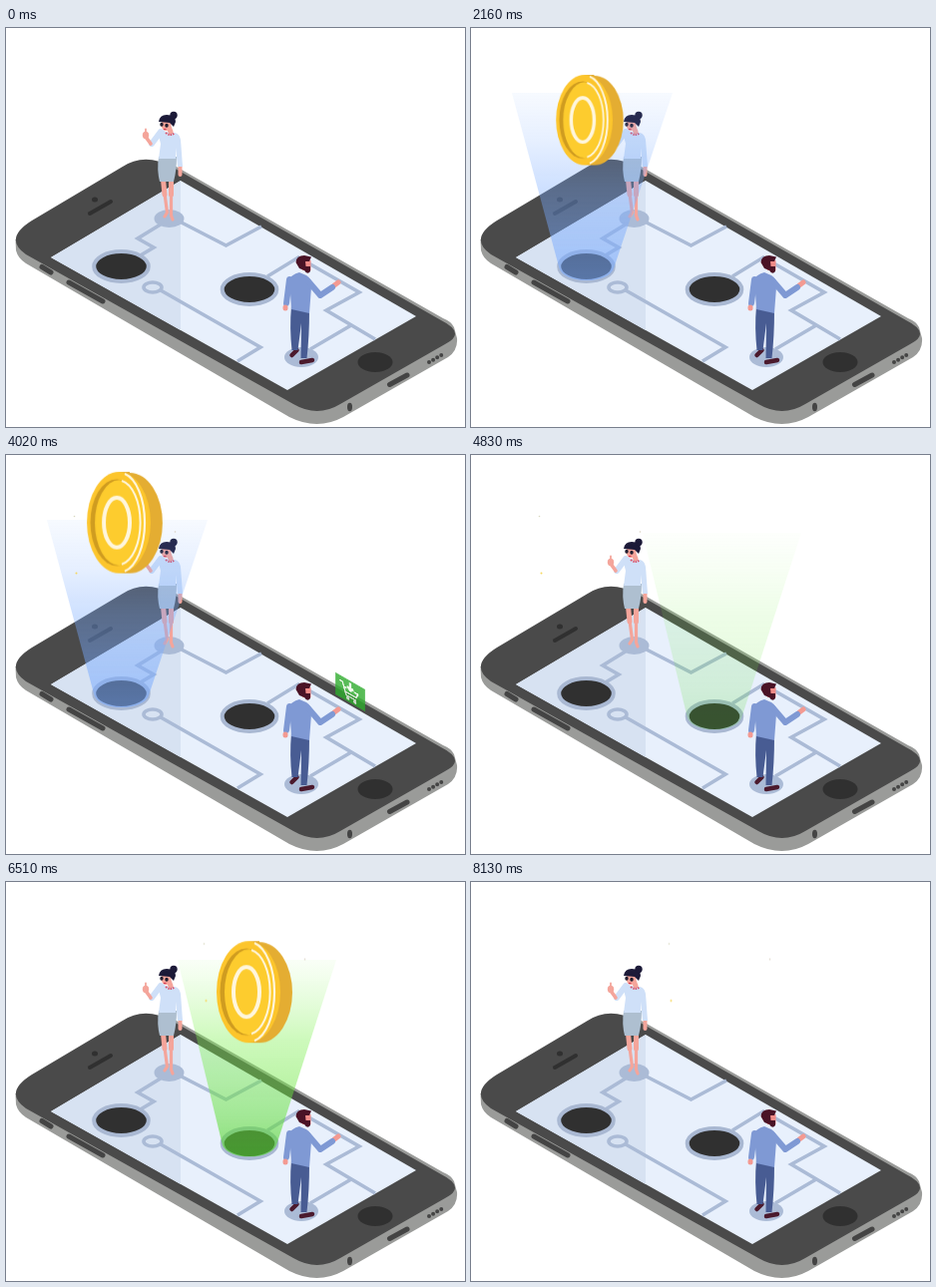
These frames come from a looping animation (460 px wide and 400 px high, 8.28 s). An HTML page:

```html
<!DOCTYPE html>
<html lang="en">
<head>
<meta charset="utf-8">
<title>Isometric phone with coins</title>
<style>
  html, body { margin: 0; width: 100%; height: 100%; overflow: hidden; background: #fff; }
  svg { display: block; width: 460px; height: 400px; }

  .trace { fill: none; stroke: #abbbd6; stroke-width: 3.6; }
  .slot { fill: none; stroke: #444; stroke-width: 5; stroke-linecap: round; }
  .limb { fill: none; stroke-linecap: round; stroke-linejoin: round; }
  .hole { fill: #303030; stroke: #a9b8d2; stroke-width: 4; }
  .skin { stroke: #f4a59b; }

  /* Both beams run the same sequence, started at different times. */
  .blue { --start: -7050ms; }
  .green { --start: -3690ms; }
  .beam, .coin, .sparks { animation: 8280ms linear var(--start) infinite; }
  .beam { animation-name: beam; }
  .coin { animation-name: coin, show; }
  .sparks { animation-name: sparks; animation-timing-function: step-end; }
  .card { animation: card 8280ms linear infinite; }
  .arm { transform-origin: 154px 104px; animation: arm 8280ms ease-in-out infinite; }
  .forearm { transform-origin: 145px 116px; animation: forearm 8280ms ease-in-out infinite; }

  @keyframes beam {
    0% { opacity: 0; }
    8.45%, 36.35% { opacity: 1; }
    42.75%, 100% { opacity: 0; }
  }
  @keyframes coin {
    0%, 8.57% { transform: translateY(180px) scale(.2); animation-timing-function: cubic-bezier(.333, 1, .667, 1); }
    14.13% { transform: none; }
    19.57% { transform: none; animation-timing-function: ease-in-out; }
    26.21% { transform: translateY(40px); animation-timing-function: ease-in-out; }
    32.85% { transform: none; animation-timing-function: cubic-bezier(.333, 0, .667, 0); }
    38.41%, 100% { transform: translateY(180px) scale(.2); }
  }
  @keyframes show {
    0%, 8.57% { opacity: 0; }
    10%, 36.9% { opacity: 1; }
    38.41%, 100% { opacity: 0; }
  }
  @keyframes sparks {
    0% { opacity: 0; }
    12.68% { opacity: 1; }
    44.56%, 100% { opacity: 0; }
  }
  @keyframes card {
    0%, 32.13% { transform: scale(0); opacity: 1; }
    35.14%, 47.34% { transform: scale(1); opacity: 1; }
    50.36%, 100% { transform: scale(0); opacity: .5; }
  }
  @keyframes arm {
    0%, .36%, 6.52%, 100% { transform: rotate(0deg); }
    2.2% { transform: rotate(45deg); }
    4.2% { transform: rotate(-20deg); }
  }
  @keyframes forearm {
    0%, .36%, 6.52%, 100% { transform: rotate(0deg); }
    2.2% { transform: rotate(-100deg); }
    4.2% { transform: rotate(-110deg); }
  }
</style>
</head>
<body>
<svg viewBox="0 0 460 400">
  <defs>
    <linearGradient id="blueLight" x2="0" y2="1">
      <stop offset="0" stop-color="#78aaff" stop-opacity=".06"/>
      <stop offset=".25" stop-color="#78aaff" stop-opacity=".18"/>
      <stop offset=".5" stop-color="#78aaff" stop-opacity=".36"/>
      <stop offset="1" stop-color="#78aaff" stop-opacity=".58"/>
    </linearGradient>
    <linearGradient id="greenLight" x2="0" y2="1">
      <stop offset="0" stop-color="#a0f878" stop-opacity=".06"/>
      <stop offset=".4" stop-color="#7df04f" stop-opacity=".38"/>
      <stop offset=".8" stop-color="#66e03c" stop-opacity=".54"/>
      <stop offset="1" stop-color="#52d030" stop-opacity=".66"/>
    </linearGradient>
    <g id="coin">
      <ellipse cx="5" cy=".5" rx="33" ry="50.5" fill="#e4ad32"/>
      <path d="M-6-51H5V51H-6Z" fill="#e4ad32"/>
      <ellipse cx="-6" rx="32" ry="51" fill="#fcc52c"/>
      <ellipse cx="-8" rx="26.5" ry="43.5" fill="#cf9c20"/>
      <ellipse cx="-5.5" cy=".3" rx="24.5" ry="43" fill="#fdcc2e"/>
      <g fill="none" stroke="#fff6dc">
        <path stroke-width="2.2" d="M0-49A25 50 0 0 1 0 49"/>
        <path stroke-width="2" d="M-3-42A22 42.500 0 0 1-3 42"/>
        <ellipse cx="-8" rx="13" ry="25" stroke-width="4"/>
      </g>
    </g>
    <g id="sparks">
      <circle cx="68.5" cy="61.5" r=".8" fill="#d8d8c0"/>
      <circle cx="169.5" cy="77" r=".8" fill="#d8d0c0"/>
      <circle cx="70.5" cy="118.5" r="1" fill="#f5d860"/>
    </g>
  </defs>

  <g id="phone">
    <path fill="#9a9b99" d="M9.500 212L10 223Q12 231 20 236L284 390Q312 404 338 390L443 330Q453 323 452 311L449 300Q446 294 438 291L168 137.500L100 190Z"/>
    <path fill="#4a4a4a" d="M26 193L116 139.500Q139 124 167 139.500L436 293Q462 306 440 317L335 377Q312 391 288 377L20 227Q-3 211 26 193Z"/>
    <path fill="#e8f0fc" d="M45 230L175 153L411 289L282 363Z"/>
    <path fill="#d7e2f2" d="M45 230L175 153V303Z"/>
    <path class="slot" d="M36 239.500L45 245M63 255L97 274"/>
    <path class="slot" stroke-width="4.500" d="M384.500 357.500L402 348"/>
    <path d="M84 186L105 174" stroke="#303030" stroke-width="4" stroke-linecap="round"/>
    <ellipse cx="89" cy="172" rx="3" ry="2.500" fill="#303030"/>
    <ellipse cx="370" cy="335" rx="17.500" ry="10" fill="#303030"/>
    <ellipse cx="344.500" cy="380" rx="2.500" ry="4.200" fill="#444"/>
    <path d="M424 335L438 327" stroke="#444" stroke-width="4" stroke-linecap="round" stroke-dasharray="0 4.700"/>

    <g class="trace">
      <path d="M170 192L220.500 218L256 199M158 195L132 211L148 220L133 229"/>
      <path d="M155 263L255 320L232 334"/>
      <path d="M262 249L293 230L354 265L321 283L370 312M346 298L305 322"/>
      <ellipse cx="147" cy="260" rx="9" ry="5"/>
    </g>
    <ellipse cx="163.500" cy="191" rx="15" ry="9" fill="#abbbd6"/>
    <ellipse cx="296" cy="330" rx="17" ry="10" fill="#abbbd6"/>
    <ellipse class="hole" cx="115.500" cy="239" rx="27.300" ry="15"/>
    <ellipse class="hole" cx="244" cy="262" rx="27.300" ry="15"/>
  </g>

  <g id="woman">
    <path class="limb skin" stroke-width="5" d="M157.500 152L159 167M165.500 152L165.500 167"/>
    <path class="limb skin" stroke-width="3.200" d="M159 166L161.500 185L159 189M165.500 166L165.500 188L167 192"/>
    <path class="limb skin" stroke-width="4" d="M174.500 139V147"/>
    <path fill="#aebfd0" d="M153 129H171Q171 143 168 154H154Q151 142 153 129Z"/>
    <path fill="#cfe0f8" d="M152 104Q156 100 160 104L169 105Q174 106 175 112L177 139H172L170 120V131H153L155 116Z"/>
    <path class="limb skin" stroke-width="5" d="M163 99L165 104"/>
    <path d="M160 105Q165 109 169 105" fill="none" stroke="#d9536a" stroke-width="2" stroke-dasharray="1.500 1"/>
    <ellipse cx="160.500" cy="97" rx="5" ry="6" fill="#f7a69b"/>
    <path fill="#1c1a38" d="M153 94Q154 87 161 87Q170 87 170 94L168 99L164 95Z"/>
    <circle cx="168" cy="87.500" r="3.700" fill="#1c1a38"/>
    <path d="M156 96.500V97M161 97.500V98" stroke="#252031" stroke-width="3.400" stroke-linecap="round"/>
    <path d="M158 101.500H160.500" stroke="#d33b52" stroke-width="1.300"/>
    <g class="arm">
      <path class="limb" stroke="#cfe0f8" stroke-width="6" d="M155 104L146 116"/>
      <g class="forearm">
        <path class="limb skin" stroke-width="3.600" d="M145 116L140 109"/>
        <ellipse cx="140" cy="107.500" rx="3.200" ry="3.700" fill="#f4a59b"/>
        <path class="limb skin" stroke-width="1.800" d="M140 107V101.500"/>
      </g>
    </g>
  </g>

  <g class="blue">
    <path class="beam" fill="url(#blueLight)" d="M41 65H202L143 241A27.500 14 0 0 1 88.500 241Z"/>
  </g>
  <g class="green">
    <path class="beam" fill="url(#greenLight)" d="M172 78H331L271 264A27.500 14 0 0 1 217 264Z"/>
  </g>

  <g id="man">
    <path d="M291.500 323L286.500 328M307 333L296 335" class="limb" stroke="#4b1a2d" stroke-width="4.500"/>
    <path fill="#485c93" d="M286 279L304 282Q304 310 301.500 331H295.500L296 296L292.500 323H286.500Q284 300 286 279Z"/>
    <path class="limb" stroke="#7f99d4" stroke-width="6" d="M284 252L281 276"/>
    <path class="limb" stroke="#f39a92" stroke-width="5" d="M280 280V281M329 258L333 255"/>
    <path fill="#7f99d4" d="M282 254Q286 247 294 245L301 248Q307 251 306 260L304 286L286 282L285 266Z"/>
    <path class="limb" stroke="#7f99d4" stroke-width="6" d="M303 254L315 268L327 260"/>
    <path fill="#f08b88" d="M297 233H305.500V243H297Z"/>
    <path fill="#4a1326" d="M290.500 235Q291 228 299 228L306 229.500L304 234H300L300.500 239H305V244Q302 248 299 243L294 241Z"/>
  </g>

  <g transform="translate(345 237.500)">
    <g class="card">
      <g transform="skewY(30)">
        <path fill="#2dab2c" d="M-25-18.500H25V18.500H-25Z"/>
        <g fill="none" stroke="#effbea" stroke-width="2.400" stroke-linejoin="round">
          <path d="M-18-10H-13L-7 9H10M-11-3H-6M6-3H13L10 4H-8"/>
          <path stroke-width="4" d="M0-15V-4M-5-7L0-2L5-7"/>
          <circle cx="-4" cy="13" r="1.500"/>
          <circle cx="8" cy="13" r="1.500"/>
        </g>
      </g>
    </g>
  </g>

  <g class="blue">
    <g transform="translate(119 67)"><use class="coin" href="#coin"/></g>
    <use class="sparks" href="#sparks"/>
  </g>
  <g class="green">
    <g transform="translate(249 87)"><use class="coin" href="#coin"/></g>
    <g transform="translate(130 .500)"><use class="sparks" href="#sparks"/></g>
  </g>
</svg>
</body>
</html>
```
